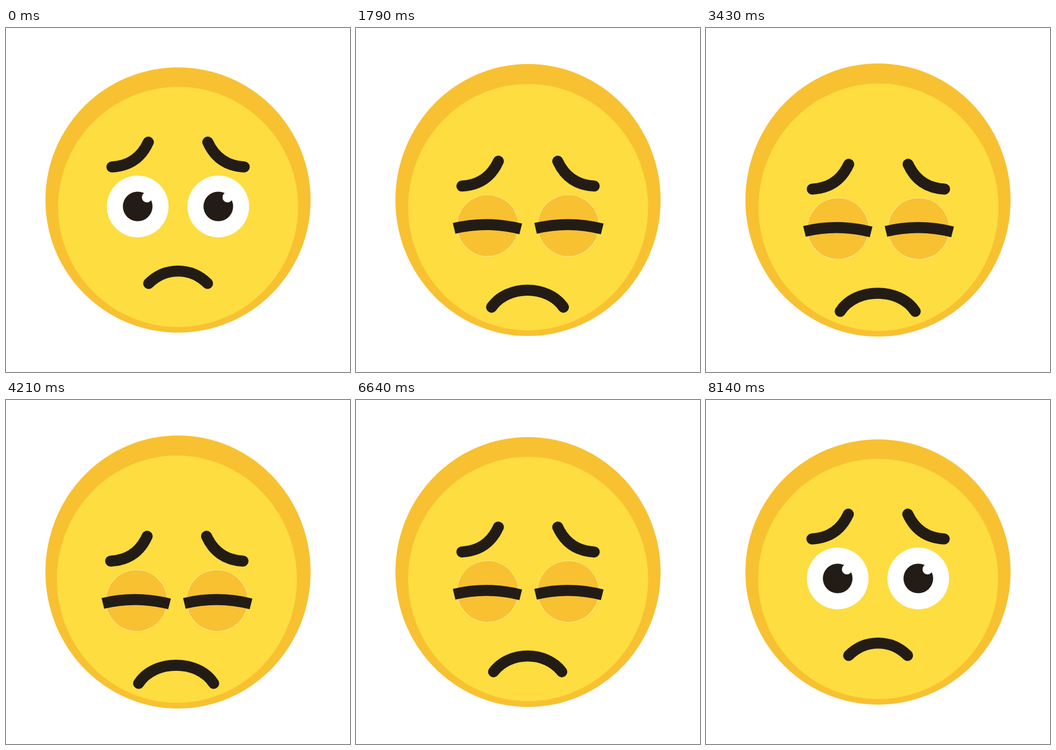
An HTML page for the animation above (8210 ms loop, 640 by 640 pixels).

```html
<!DOCTYPE html>
<html lang="en">
<head>
<meta charset="utf-8">
<title>Sad face</title>
<style>
  html, body { margin: 0; width: 100%; height: 100%; overflow: hidden; background: #fff; }
  svg { display: block; width: 100vw; height: 100vh; }
  .ink { fill: none; stroke: #231c16; stroke-width: 20.5; }
  .round { stroke-linecap: round; }
  .lid { fill: #f8c132; }
</style>
</head>
<body>
<svg viewBox="0 0 640 640">
  <defs>
    <clipPath id="socket"><circle r="57"/></clipPath>
    <g id="openEye">
      <circle r="57.4" fill="#fff"/>
      <circle r="27.6" fill="#231c16"/>
      <circle cx="17.2" cy="-17" r="9.4" fill="#fff"/>
    </g>
  </defs>
  <ellipse id="head" cx="320" cy="320" rx="246.7" fill="#f8c132"/>
  <g id="sway">
    <ellipse id="face" cx="320.2" rx="223.2" fill="#fddd40"/>
    <g id="features">
      <path class="ink round" d="M197 258.5Q245 256 264.8 212.3"/>
      <path class="ink round" d="M443.2 258.5Q395.2 256 375.4 212.3"/>
      <g class="eye" transform="translate(245 332)"></g>
      <g class="eye" transform="translate(395 332)"></g>
      <path id="mouth" class="ink round"/>
    </g>
  </g>
</svg>
<script>
const LOOP = 8210;
const $ = id => document.getElementById(id);

// Each track is a list of [time, value]; values ease in and out between keys.
const tracks = {
  drop:  [[10, 0], [2330, 1], [5580, 1], [7980, 0]],
  frown: [[460, 0], [2330, 1], [5580, 1], [7940, 0]],
  shut:  [[650, 0], [1250, 1], [6900, 1], [7500, 0]],
  sway:  [[2480, 0], [2980, -5.5], [3760, 4.5], [4320, -3], [5260, 2.7], [6000, 0]]
};

const mix = (a, b, k) => a + (b - a) * k;
const ease = u => u * u * (3 - 2 * u);

function valueAt(keys, t) {
  if (t <= keys[0][0]) return keys[0][1];
  for (let i = 1; i < keys.length; i++) {
    const [t0, a] = keys[i - 1], [t1, b] = keys[i];
    if (t < t1) return mix(a, b, ease((t - t0) / (t1 - t0)));
  }
  return keys[keys.length - 1][1];
}

function set(el, attrs) {
  for (const name in attrs) el.setAttribute(name, attrs[name]);
}

const eyes = [...document.querySelectorAll('.eye')].map((el, i) => {
  el.innerHTML = `<use href="#openEye"/>
    <g clip-path="url(#socket)"><path class="lid"/><path class="lid"/></g>
    <path class="ink"/>`;
  const [upper, lower, line] = el.querySelectorAll('path');
  return { upper, lower, line, shift: i * 1.6 - 0.5 };
});

function drawEye({ upper, lower, line, shift }, shut) {
  const y = -58 * (1 - shut);
  const low = 60 * (1 - Math.min(1, shut * 1.1));
  const half = 62 * Math.sqrt(Math.max(0, 1 - (y / 58) ** 2));
  set(upper, { d: `M-62 -70V${y + 5}Q0 ${y - 9.5} 62 ${y + 6}V-70Z` });
  set(lower, { d: `M-62 70V${low + y * (low ? 0 : 1)}H62V70Z` });
  set(line, {
    d: `M${shift - half} ${y + 5.2}Q${shift} ${y - 9.5} ${shift + half} ${y + 6.2}`,
    visibility: shut > 0.03 ? 'visible' : 'hidden'
  });
}

function drawMouth(k) {
  const x = mix(320.2, 318.8, k);
  const w = mix(54.8, 69.8, k);
  const c = mix(24, 41, k);
  const end = mix(475.3, 486, k);
  const top = (452.2 - end * 0.25) / 0.75;
  set($('mouth'), { d: `M${x - w} ${end}C${x - c} ${top} ${x + c} ${top} ${x + w} ${end}` });
}

function draw(t) {
  const drop = valueAt(tracks.drop, t);
  const shut = valueAt(tracks.shut, t);
  set($('head'), { ry: mix(246.8, 254.1, drop) });
  set($('face'), { cy: mix(332.9, 333.3, drop), ry: mix(223.4, 230, drop) });
  set($('sway'), { transform: `translate(${valueAt(tracks.sway, t)} 0)` });
  set($('features'), { transform: `translate(0 ${41.2 * drop})` });
  eyes.forEach(eye => drawEye(eye, shut));
  drawMouth(valueAt(tracks.frown, t));
}

const start = performance.now();
function tick() {
  draw((performance.now() - start) % LOOP);
  requestAnimationFrame(tick);
}
tick();
</script>
</body>
</html>
```
